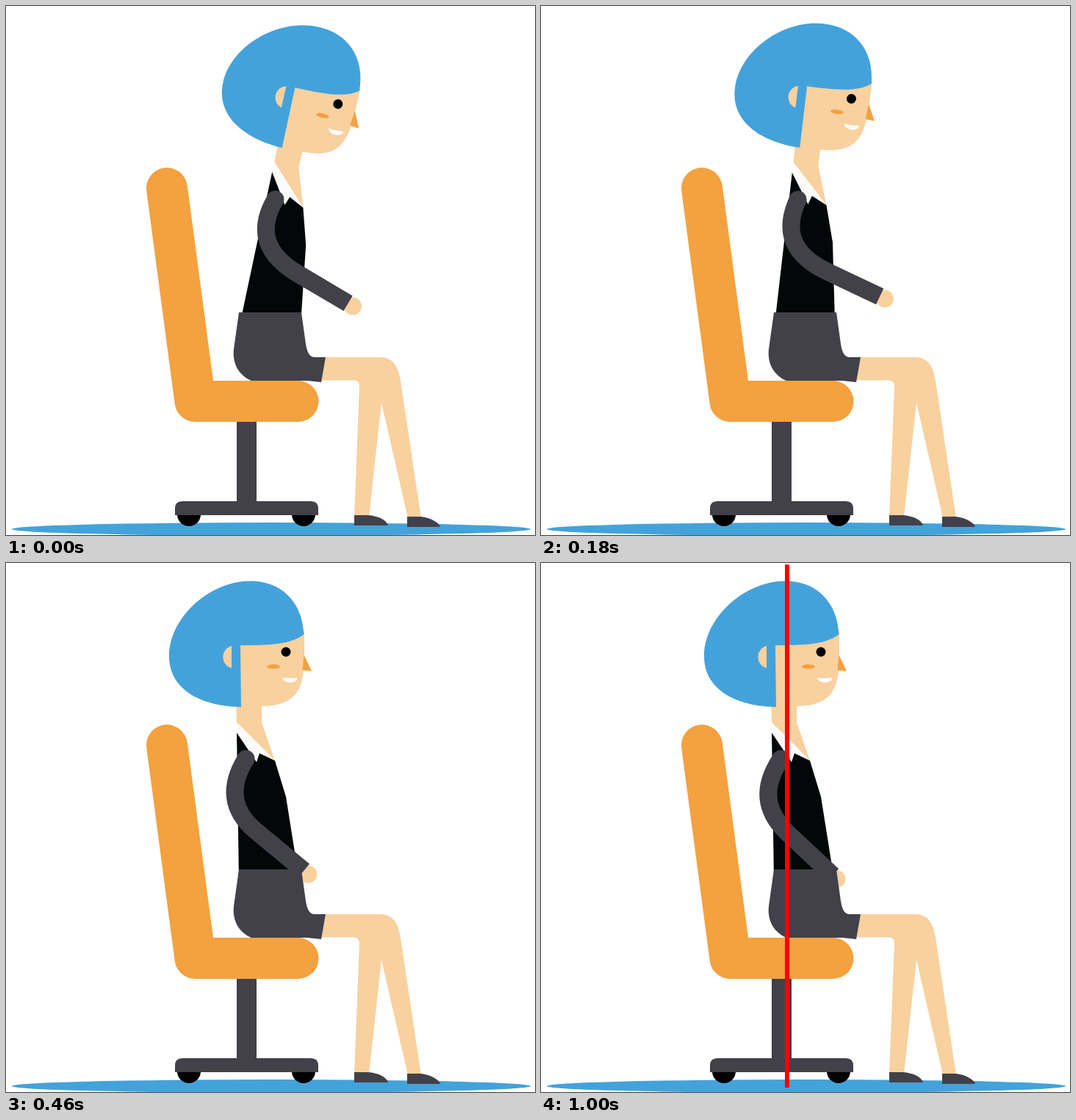
An HTML page with a canvas that plays this animation: 720x720 px, repeating every 2 s.

```html
<!DOCTYPE html>
<html lang="en">
<head>
<meta charset="utf-8">
<title>Sitting upright</title>
<style>
  html, body { margin: 0; width: 100%; height: 100%; overflow: hidden; background: #fff; }
  canvas { display: block; width: 100%; height: 100%; }
</style>
</head>
<body>
<canvas id="stage" width="720" height="720"></canvas>
<script>
const ctx = document.getElementById('stage').getContext('2d');
const LOOP = 2000, STEP = 20;
const BLUE = '#44a2db', ORANGE = '#f4a13f', SKIN = '#f8d19f';
const DARK = '#424149', BLACK = '#030708', WHITE = '#fbfbfb';
const HIP = [361, 443];

const clamp = v => Math.min(1, Math.max(0, v));
const span = (t, a, b) => clamp((t - a) / (b - a));
const sine = p => (1 - Math.cos(Math.PI * p)) / 2;
const cubic = p => p < 0.5 ? 4 * p ** 3 : 1 - 4 * (1 - p) ** 3;
const mix = (a, b, k) => a + (b - a) * k;

function shape(color, d) {
  ctx.fillStyle = color;
  ctx.fill(new Path2D(d));
}

function oval(color, x, y, rx, ry = rx) {
  ctx.fillStyle = color;
  ctx.beginPath();
  ctx.ellipse(x, y, rx, ry, 0, 0, 2 * Math.PI);
  ctx.fill();
}

function line(color, width, d, cap = 'butt') {
  ctx.strokeStyle = color;
  ctx.lineWidth = width;
  ctx.lineCap = cap;
  ctx.lineJoin = 'round';
  ctx.stroke(new Path2D(d));
}

// Torso angle in degrees: lean in, swing back too far, settle.
const LEAN = [[0, 12.8], [76, 15.45], [302, -2.9], [385, 0]];
function lean(t) {
  for (let i = 1; i < LEAN.length; i++) {
    const [t0, a0] = LEAN[i - 1], [t1, a1] = LEAN[i];
    if (t < t1) return mix(a0, a1, sine(span(t, t0, t1)));
  }
  return 0;
}

function chair() {
  oval(BLUE, 361, 712, 353, 9);
  oval('#000', 249, 692, 16);
  oval('#000', 405, 692, 16);
  shape(DARK, 'M314 560H341V674H415Q425 674 425 684V693H230V684Q230 674 240 674H314Z');
  line(ORANGE, 56, 'M219 248L257.5 538H397.5', 'round');
}

function legs() {
  shape(SKIN, 'M433 478H510C526 478 534 490 537 510L565 697H547L511 540L494 695H474L481 518Q481 509.5 474 509.5H428Z');
  shape(DARK, 'M474 693H492C508 694 518 700 520 707H474Z');
  shape(DARK, 'M546 695H565C580 697 590 704 591 709H546Z');
}

function skirt() {
  shape(DARK, 'M317 417H402L408 460C410 473 414 478 420 478H435L429 512L410 510H334C316 502 308 486 310 467Z');
}

function head() {
  shape(SKIN, 'M316 100L406 94V130C405 172 396 194 348 195V217L366 269L314 217L313 180Z');
  shape(ORANGE, 'M405.5 125L416 147L403.5 146Z');
  shape(BLUE, 'M405.5 97C403 50 372 24.5 333 24.5C276 24.5 222 75 222 127C222 170 262 195 320 196L319 112C358 112 388 111 405.5 97Z');
  shape(SKIN, 'M307 113A15.5 15.5 0 0 0 307 143Z');
  oval('#000', 381, 121, 6.5);
  oval(ORANGE, 364, 141, 9, 3);
  shape(WHITE, 'M375.5 156Q386 157.5 396.5 156C396 165 378 165 375.5 156Z');
}

function torso() {
  shape(BLACK, 'M314 229L366 269L381 318L398 425L317 432Z');
  shape(WHITE, 'M314 217L366 269L345 259L341 271L314 231Z');
}

// Each pair holds a joint with the arm forward and at rest.
const ARM = [
  [[316, 300], [302, 303]],
  [[318, 338], [303, 336]],
  [[378, 358], [335, 367]],
  [[454.5, 382.5], [397, 425]]
];
function arm(k) {
  const [c1, c2, elbow, wrist] = ARM.map(([a, b]) => [mix(a[0], b[0], k), mix(a[1], b[1], k)]);
  const dir = Math.atan2(wrist[1] - elbow[1], wrist[0] - elbow[0]);
  oval(SKIN, wrist[0] + 7.5 * Math.cos(dir), wrist[1] + 7.5 * Math.sin(dir), 12);
  oval(DARK, 326.5, 266.5, 12);
  line(DARK, 24, `M326.5 266.5C${c1} ${c2} ${elbow}L${wrist}`);
}

function plumbLine(t) {
  const p = span(t, 600, 1000);
  if (!p) return;
  ctx.globalAlpha = p;
  ctx.fillStyle = '#f00';
  ctx.fillRect(332, mix(720, 2, cubic(p)), 6, 712);
  ctx.globalAlpha = 1;
}

function draw(t) {
  ctx.fillStyle = '#fff';
  ctx.fillRect(0, 0, 720, 720);
  chair();
  legs();
  ctx.save();
  ctx.translate(...HIP);
  ctx.rotate(lean(t) * Math.PI / 180);
  ctx.translate(-HIP[0], -HIP[1]);
  head();
  torso();
  arm(sine(span(t, 160, 560)));
  ctx.restore();
  skirt();
  plumbLine(t);
}

const start = performance.now();
function tick() {
  const t = (performance.now() - start) % LOOP;
  draw(Math.floor(t / STEP) * STEP);
  requestAnimationFrame(tick);
}
tick();
</script>
</body>
</html>
```
